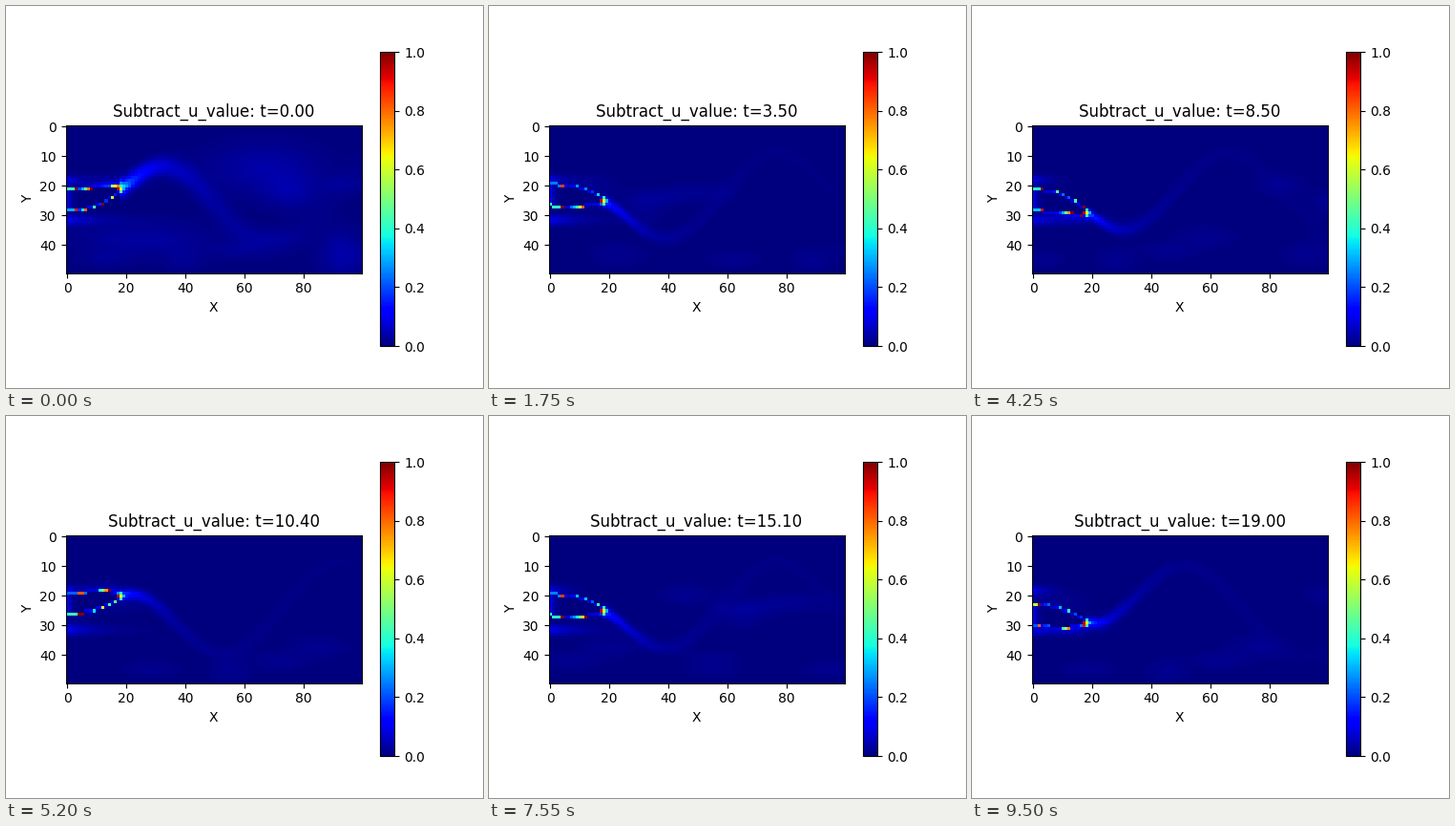
These frames come from a looping animation (500x400 px, 9550 ms). A matplotlib script:

```python
import numpy as np
import matplotlib.pyplot as plt
from matplotlib.animation import FuncAnimation

NX, NY = 100, 50
FRAMES, STEP_MS, DT = 191, 50, 0.1
RATE, START = np.radians(62), np.radians(12)   # swimming phase
LAG = np.radians(60)                           # phase lag from head to tail
WAKE_K = np.radians(4.47)                      # wake phase per cell
TAIL, MID = 19, 24.5

X, Y = np.meshgrid(np.arange(NX), np.arange(NY))
cols = np.arange(18)

rng = np.random.default_rng(4)
blobs = np.column_stack([rng.uniform(0, 130, 9), rng.uniform(4, 46, 9),
                         rng.uniform(4, 8, 9), rng.uniform(1.5, 3, 9)])


def bell(x, y, sx, sy):
    return np.exp(-((X - x) / sx) ** 2 / 2 - ((Y - y) / sy) ** 2 / 2)


def body(x, phase):
    """Centre line and half thickness of the swimming body."""
    s = np.clip(x / TAIL, 0, 1)
    amp = 2.1 + 0.6 * s + 2.8 * s ** 2
    return MID + amp * np.sin(phase - LAG * s), 3.55 * (1 - s ** 3)


def edge_values(edge, base, run_end, early):
    """Error along one body edge, peaking just before each row step."""
    rows = np.rint(edge).astype(int)
    part = edge - rows + 0.5
    near = np.where(np.gradient(edge) > 0, part, 1 - part)
    rise = np.clip((cols - 5) / 8, 0.15, 1) + early
    flank = 0.08 + 1.1 * rise * near ** 4
    head = base + 0.6 * (cols > run_end - 1.4)
    return rows, np.where(cols <= run_end, head, flank)


def wake(phase, early):
    d = np.maximum(X - TAIL, 0)
    amp = 5.5 + 10.5 * (1 - np.exp(-d / 15))
    path = MID + amp * np.sin(phase - LAG - WAKE_K * d)
    slope = amp * WAKE_K * np.cos(phase - LAG - WAKE_K * d)
    width = (1.1 + 0.02 * d + 0.8 * early) * np.sqrt(1 + slope ** 2)
    level = 0.13 * np.exp(-d / 8) + 0.022 * np.exp(-d / 45)
    level = level + 0.07 * early * np.exp(-d / 20)
    return level * np.exp(-((Y - path) / width) ** 2 / 2) * (X >= TAIL - 1)


def field(t):
    phase = START + RATE * t
    early = np.exp(-t / 0.35)
    z = wake(phase, early)

    for x, y, sx, sy in blobs:
        z += 0.016 * bell((x + 14 * t) % 130 - 10, y, sx, sy)
    z += early * (0.035 * bell(66, 14, 13, 6) + 0.03 * bell(75, 22, 6, 4)
                  + 0.03 * bell(25, 38, 16, 4) + 0.035 * bell(92, 43, 5, 6))

    # shear layers beside the head
    z += 0.1 * np.exp(-((Y - 18) / 1.2) ** 2 / 2 - X / 4)
    z += 0.1 * np.exp(-((Y - 31.5) / 1.3) ** 2 / 2 - X / 9)

    # boundary layer on the side the tail is swinging to
    mid, half = body(X, phase)
    top, low = mid - half, mid + half
    swing = np.sin(phase - LAG)
    ramp = np.clip((X - 3) / 12, 0, 1) * np.exp(-np.maximum(X - 18, 0) / 2.5)
    up = np.maximum(top - Y, 0)
    down = np.maximum(Y - low, 0)
    glow = 0.17 + 0.15 * early
    z += glow * max(-swing, 0) * ramp * np.exp(-up / 1.3) * (Y < top)
    z += glow * max(swing, 0) * ramp * np.exp(-down / 1.3) * (Y > low)

    inside = (Y > top) & (Y < low) & (X < TAIL)
    z = np.where(inside, 0.1 * np.exp(-X / 1.2), z)

    mid, half = body(cols, phase)
    lift = np.sin(phase)
    run_end = 4 - 1.3 * lift
    for edge, base in ((mid - half, 0.4 + 0.2 * lift),
                       (mid + half, 0.32 - 0.12 * lift)):
        rows, values = edge_values(edge, base, run_end, early)
        z[rows, cols] = np.maximum(z[rows, cols], values)

    tip = int(np.rint(body(TAIL - 0.5, phase)[0]))
    z[tip - 1:tip + 2, 18] = 0.4, 0.65, 0.45
    z[tip, 17] = 0.95
    z[tip, 19] = max(z[tip, 19], 0.3)
    return np.clip(z, 0, 1)


fig, ax = plt.subplots(figsize=(5, 4), dpi=100)
image = ax.imshow(field(0), cmap="jet", vmin=0, vmax=1)
fig.colorbar(image)
ax.set_xlabel("X")
ax.set_ylabel("Y")
title = ax.set_title("Subtract_u_value: t=0.00")


def update(i):
    t = i * DT
    image.set_data(field(t))
    title.set_text(f"Subtract_u_value: t={t:.2f}")
    return image, title


anim = FuncAnimation(fig, update, frames=FRAMES, interval=STEP_MS, repeat=True)
plt.show()
```
